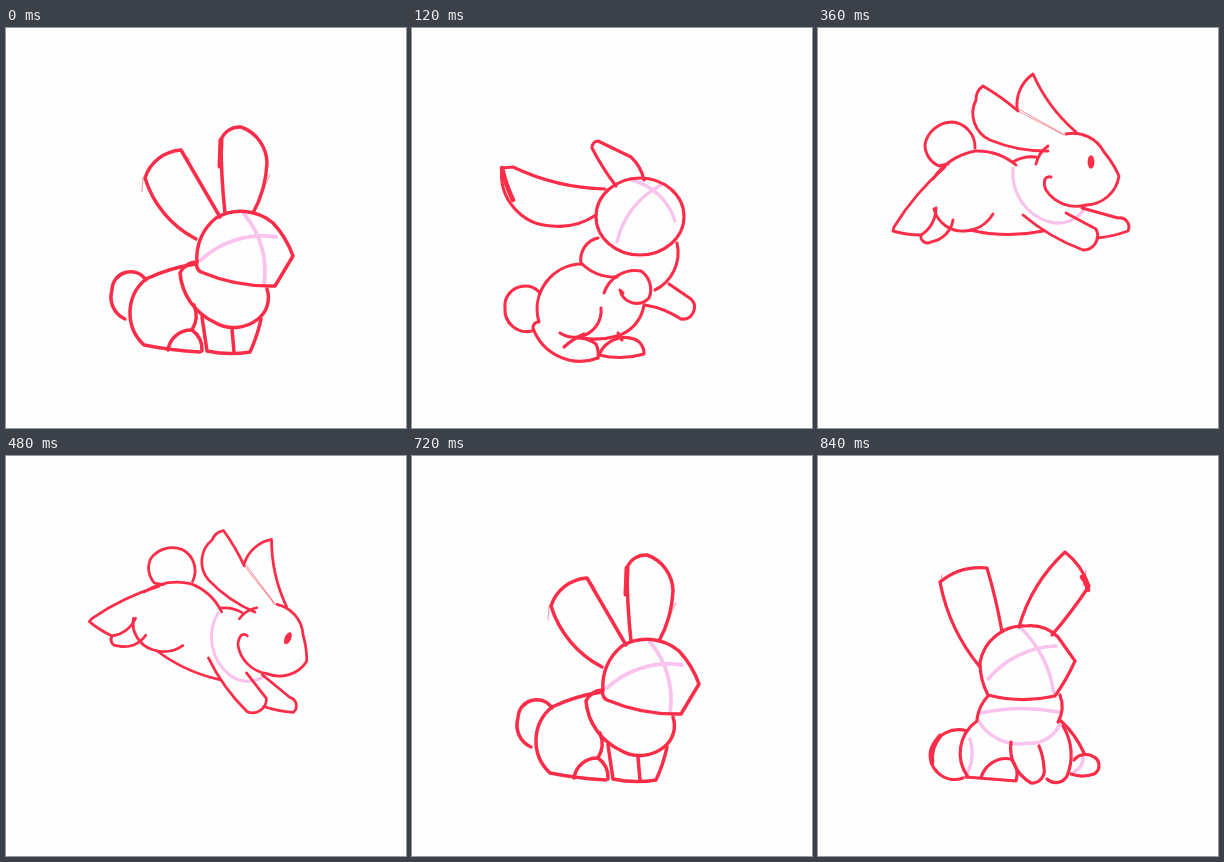
Write an HTML page with a canvas that moves like this. It is 400 by 400 pixels and loops after 1440 ms.

```html
<!DOCTYPE html>
<html lang="en">
<head>
<meta charset="utf-8">
<title>Hopping rabbit sketch</title>
<style>
html, body { margin: 0; width: 100%; height: 100%; overflow: hidden; background: #fefefe; }
canvas { display: block; width: 100vw; height: 100vh; }
</style>
</head>
<body>
<canvas id="stage" width="400" height="400"></canvas>
<script>
const ctx = document.getElementById('stage').getContext('2d');
const RED = '#fc2d48', PINK = '#fac3ee', PAPER = '#fefefe';
const STEP = 120, LOOP = 1440;
let pen = 3;

// Adds an arc to (x2, y2) that bulges by `bow` to the left of its direction.
function arcTo(x1, y1, bow, x2, y2) {
  const dx = x2 - x1, dy = y2 - y1, length = Math.hypot(dx, dy);
  const inset = 1 / 3 - (bow / length) ** 2 * 4 / 3;
  const nx = dy / length * bow * 4 / 3, ny = -dx / length * bow * 4 / 3;
  ctx.bezierCurveTo(
    x1 + dx * inset + nx, y1 + dy * inset + ny,
    x2 - dx * inset + nx, y2 - dy * inset + ny, x2, y2);
}

// Strokes a chain: x, y, then bow, x, y for every further point.
function chain(color, width, alpha, [x, y, ...rest]) {
  ctx.beginPath();
  ctx.moveTo(x, y);
  while (rest.length) {
    const [bow, nextX, nextY] = rest.splice(0, 3);
    arcTo(x, y, bow, nextX, nextY);
    [x, y] = [nextX, nextY];
  }
  ctx.strokeStyle = color;
  ctx.lineWidth = width;
  ctx.globalAlpha = alpha;
  ctx.stroke();
  ctx.globalAlpha = 1;
}

const ink = (...points) => chain(RED, pen, 1, points);
const bold = (...points) => chain(RED, pen + 1.5, 1, points);
const thin = (...points) => chain(RED, 1, 0.5, points);
const guide = (...points) => chain(PINK, pen + 0.3, 1, points);

function ellipse(x, y, rx, ry) {
  ctx.beginPath();
  ctx.ellipse(x, y, rx, ry, 0, 0, Math.PI * 2);
}

function sit() {
  pen = 3.5;
  guide(195, 232, 9, 270, 209);
  guide(238, 186, 8, 258, 257);
  // ears
  ink(214, 189, 0, 175, 122, -7, 139, 150, -8, 190, 211);
  ink(219, 185, 1, 215, 112, 4, 235, 99, 7, 261, 135, 3, 247, 185);
  bold(214, 138, 0, 215, 112);
  // head and chest
  ink(191, 234, 6, 210, 190, 9, 267, 195, 2, 287, 228, 0, 269, 258, 4, 195, 244, 2, 191, 234);
  ink(191, 234, -3, 174, 245, -8, 208, 294, -7, 252, 291, -5, 261, 261);
  // body and tail
  ink(190, 236, -2, 140, 251, -15, 138, 317, -1, 194, 324);
  ink(140, 252, -13, 106, 262, -6, 119, 291);
  // legs
  ink(162, 322, 6, 186, 302, 3, 196, 323);
  ink(188, 277, 3, 186, 302);
  ink(196, 289, 0, 201, 323, -2, 244, 324, -1, 255, 291);
  ink(226, 301, 0, 228, 324);
  thin(137, 150, 0, 136, 164);
  thin(174, 121, 0, 184, 132);
  thin(264, 147, 0, 258, 160);
}

function crouch() {
  pen = 3.1;
  guide(205, 214, 8, 249, 157);
  guide(219, 152, 8, 263, 193);
  // ears
  ink(193, 161, 5, 101, 139, 0, 90, 140, -17, 140, 198, -4, 184, 187);
  bold(90, 140, -1, 101, 172);
  ink(204, 158, 1, 180, 120, 2, 186, 113, 0, 219, 129, 2, 232, 152);
  // head and chest
  ellipse(228, 188.5, 44, 38.5);
  ctx.stroke();
  ink(186, 210, -6, 169, 235, -4, 205, 249);
  ink(265, 215, 9, 243, 262);
  // arms
  ink(192, 265, 8, 229, 243, 5, 237, 270, 9, 208, 262, 0, 211, 265);
  ink(257, 256, 0, 279, 271, 8, 269, 291, -2, 233, 277);
  // body and tail
  ink(170, 236, -18, 127, 294, -2, 121, 300, -15, 186, 330);
  ink(128, 265, -14, 93, 280, -9, 120, 303);
  ink(232, 277, 6, 205, 308, 2, 170, 310);
  // hind legs
  ink(148, 305, -15, 189, 280);
  ink(152, 319, 1, 172, 306);
  ink(163, 310, 2, 184, 316, 1, 186, 330);
  ink(188, 325, 7, 222, 311, 3, 232, 326, 3, 187, 327);
  ink(206, 305, 0, 210, 312);
}

function leap() {
  pen = 2.9;
  guide(195, 140, -12, 232, 194, -7, 268, 178);
  // tail and body
  ink(130, 136, 0, 121, 138, 4, 107, 116, 6, 134, 94, 7, 157, 120);
  ink(115, 151, 5, 157, 123, 4, 198, 137);
  ink(116, 181, -7, 147, 203, -4, 175, 186);
  ink(152, 202, -4, 225, 203);
  // hind legs
  ink(127, 139, -3, 76, 199, 0, 75, 203, -1, 103, 207, -4, 118, 180);
  ink(103, 207, -4, 113, 214, -5, 135, 192);
  // ears
  ink(230, 123, 3, 172, 112, 9, 158, 72, 2, 165, 58, 1, 200, 83);
  thin(200, 83, 0, 246, 107);
  ink(199, 80, 5, 215, 46, -4, 258, 104);
  thin(199, 80, 0, 245, 106);
  // head and neck
  ink(230, 118, -2, 218, 136);
  ink(195, 134, 2, 218, 129);
  ink(248, 106, 7, 286, 124, 1, 301, 148, 8, 268, 177, 7, 228, 162, 1, 227, 151, 1, 233, 149);
  ellipse(273, 134, 3.4, 6.8);
  ctx.fillStyle = RED;
  ctx.fill();
  // front legs
  ink(205, 187, -3, 265, 222, -7, 278, 201, 0, 248, 185);
  ink(264, 180, 0, 300, 190, 5, 310, 203, 1, 279, 210);
}

function land() {
  pen = 3;
  guide(215, 177, -11, 276, 210);
  guide(266, 172, 8, 246, 239);
  guide(139, 209, -6, 160, 230);
  guide(183, 187, 0, 188, 178);
  guide(193, 236, -8, 250, 272);
  // ears
  ink(210, 172, 4, 195, 103, 9, 246, 74, 1, 238, 158);
  ink(253, 162, 3, 268, 100, 4, 293, 82, 8, 312, 124, -4, 276, 182);
  // head
  ink(199, 195, 10, 238, 159, 9, 276, 185, 2, 277, 232, 2, 243, 244, 11, 199, 195);
  // tail and body
  ink(152, 150, 12, 178, 120, 3, 201, 130, 5, 193, 150);
  ink(210, 172, -3, 192, 149, -9, 128, 177, 0, 135, 245, -11, 171, 238, -2, 167, 228, -7, 183, 193);
  ink(201, 130, 0, 211, 168);
  // front legs and chest
  ink(168, 227, -4, 192, 259, -9, 237, 314, -2, 250, 309, 0, 235, 271);
  ink(250, 309, -3, 270, 307, -1, 262, 270);
  ink(275, 234, 8, 250, 272);
  thin(125, 178, 0, 126, 188);
  thin(118, 205, 0, 119, 209);
  thin(179, 272, 0, 181, 274);
  thin(261, 102, 0, 258, 116);
}

function front() {
  pen = 3.2;
  guide(170, 223, 8, 238, 190);
  guide(203, 172, 6, 236, 238);
  guide(163, 257, 4, 241, 256);
  guide(160, 264, -9, 210, 287, -6, 242, 268);
  guide(152, 283, 3, 150, 316);
  guide(265, 300, 3, 256, 316);
  // ears
  ink(162, 211, 6, 122, 126, 5, 169, 112, 1, 184, 176);
  ink(201, 171, 6, 247, 96, 3, 271, 130, 1, 234, 179);
  bold(264, 121, 1, 270, 134);
  // head and chest
  ink(162, 207, 11, 207, 170, 4, 240, 181, 0, 257, 205, 1, 237, 240, 4, 170, 239, 2, 162, 207);
  ink(170, 240, -2, 159, 263);
  ink(242, 239, 3, 240, 266);
  // body and tail
  ink(159, 265, -12, 150, 321);
  ink(243, 265, 2, 266, 297);
  ink(149, 275, -8, 113, 293, -13, 145, 322);
  bold(122, 280, -3, 114, 307);
  // legs
  ink(245, 270, 6, 249, 320, 5, 229, 323);
  ink(163, 322, 7, 193, 303, 3, 198, 325, 0, 148, 321);
  ink(193, 286, -7, 213, 327, -5, 226, 312, -1, 221, 290);
  ink(256, 304, 4, 276, 301, 5, 276, 318, 2, 253, 318);
  thin(124, 119, 0, 122, 132);
  thin(268, 114, 0, 265, 130);
}

// The leap drawing, tilted about its middle and moved to (x, y).
const tilted = (degrees, x, y) => () => {
  ctx.save();
  ctx.translate(x, y);
  ctx.rotate(degrees * Math.PI / 180);
  ctx.scale(0.95, 0.95);
  ctx.translate(-195, -150);
  leap();
  ctx.restore();
};

const poses = [sit, crouch, tilted(-28, 188, 190), leap, tilted(24, 208, 166), land, sit, front];

function render(time) {
  const step = Math.floor((time % LOOP) / STEP);
  ctx.fillStyle = PAPER;
  ctx.fillRect(0, 0, 400, 400);
  ctx.lineCap = ctx.lineJoin = 'round';
  poses[Math.min(step, poses.length - 1)]();
}

let start;
function tick(now) {
  start ??= now;
  render(now - start);
  requestAnimationFrame(tick);
}
render(0);
requestAnimationFrame(tick);
</script>
</body>
</html>
```
